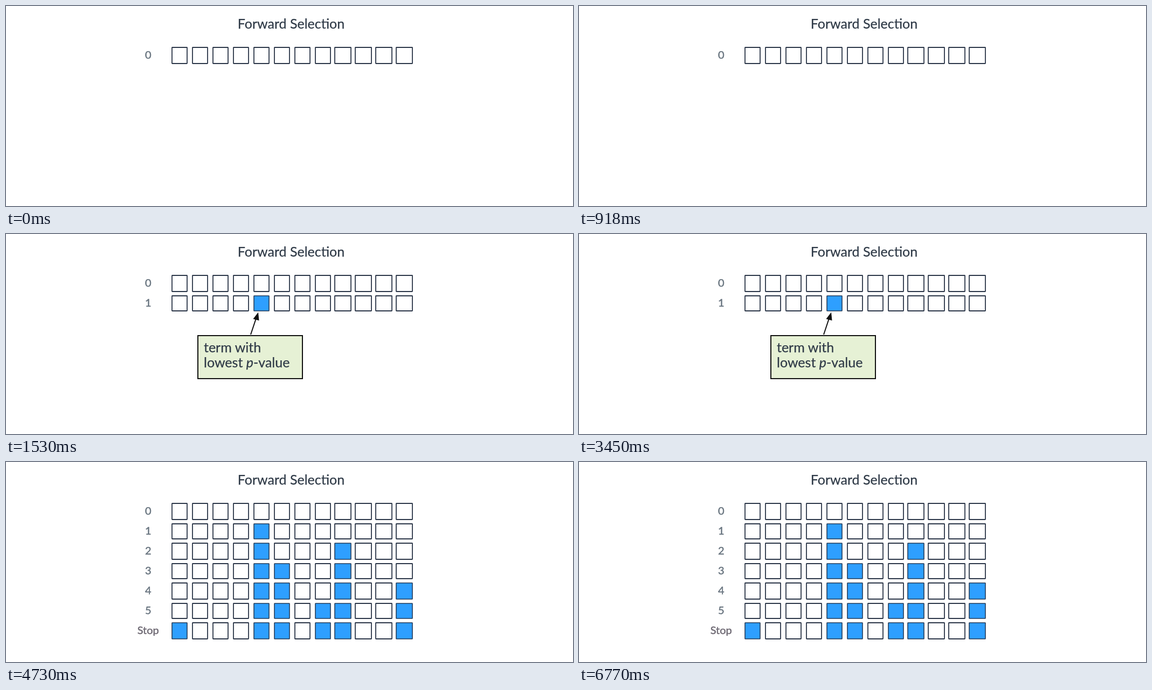
Animation of 1052x372 px, one loop 8130 ms. Source, as an HTML page:

```html
<!DOCTYPE html>
<html lang="en">
<head>
<meta charset="utf-8">
<title>Forward Selection</title>
<style>
  html, body { margin: 0; width: 100%; height: 100%; overflow: hidden; background: #fff; }
  svg { display: block; width: 1052px; height: 372px; }
  text { font-family: Lato, "Open Sans", sans-serif; font-size: 25px; fill: #2f3a47; stroke: #2f3a47; stroke-width: .25px; }
  .label { font-size: 20px; text-anchor: middle; fill: #68747f; stroke: #68747f; stroke-width: .5px; }
  .stop { fill: #6f6a74; stroke: #6f6a74; }
  .cell { fill: #fff; stroke: #2b3648; stroke-width: 1.8px; }
  .on { fill: #2e9fff; stroke: #233c5a; stroke-width: 1.6px; }

  /* Cuts at 1530 ms and 4730 ms of 8130 ms */
  .first, .rest, .note { opacity: 0; animation: first 8130ms step-end infinite; }
  .rest { animation-name: rest; }
  .note { animation-name: note; }
  @keyframes first { 0% { opacity: 0; } 18.8192%, 100% { opacity: 1; } }
  @keyframes rest { 0% { opacity: 0; } 58.1796%, 100% { opacity: 1; } }
  @keyframes note { 0% { opacity: 0; } 18.8192% { opacity: 1; } 58.1796%, 100% { opacity: 0; } }
</style>
</head>
<body>
<svg viewBox="0 0 1052 372">
  <text x="529" y="42" text-anchor="middle">Forward Selection</text>
  <g id="start"></g>
  <g id="first" class="first"></g>
  <g id="rest" class="rest"></g>
  <g class="note">
    <path d="M454 187L464 157" stroke="#111" stroke-width="2"/>
    <path d="M468 145.5L458.5 158L469.5 161Z" fill="#111"/>
    <rect x="356" y="189" width="194" height="80" fill="#e6f1d5" stroke="#111" stroke-width="2"/>
    <text x="367" y="220">term with</text>
    <text x="367" y="248">lowest <tspan font-style="italic">p</tspan>-value</text>
  </g>
</svg>
<script>
  const labels = ['0', '1', '2', '3', '4', '5', 'Stop'];
  // Row in which each chosen column enters the model
  const entry = { 4: 1, 8: 2, 5: 3, 11: 4, 7: 5, 0: 6 };

  function add(parent, tag, attrs) {
    const el = document.createElementNS('http://www.w3.org/2000/svg', tag);
    for (const key in attrs) el.setAttribute(key, attrs[key]);
    return parent.appendChild(el);
  }

  labels.forEach((label, row) => {
    const group = document.getElementById(row === 0 ? 'start' : row === 1 ? 'first' : 'rest');
    const odd = row % 2;
    const y = 76 + 37 * row + odd;
    add(group, 'text', {
      x: 263.7, y: 98 + 37 * row, class: label === 'Stop' ? 'label stop' : 'label'
    }).textContent = label;
    for (let col = 0; col < 12; col++) {
      const wide = col > 7;
      add(group, 'rect', {
        x: 308 + 38 * col - (wide ? 2 : 0),
        y: y + 1,
        width: wide ? 30 : 28,
        height: odd ? 28 : 30,
        rx: .5,
        class: row >= entry[col] ? 'cell on' : 'cell'
      });
    }
  });
</script>
</body>
</html>
```
